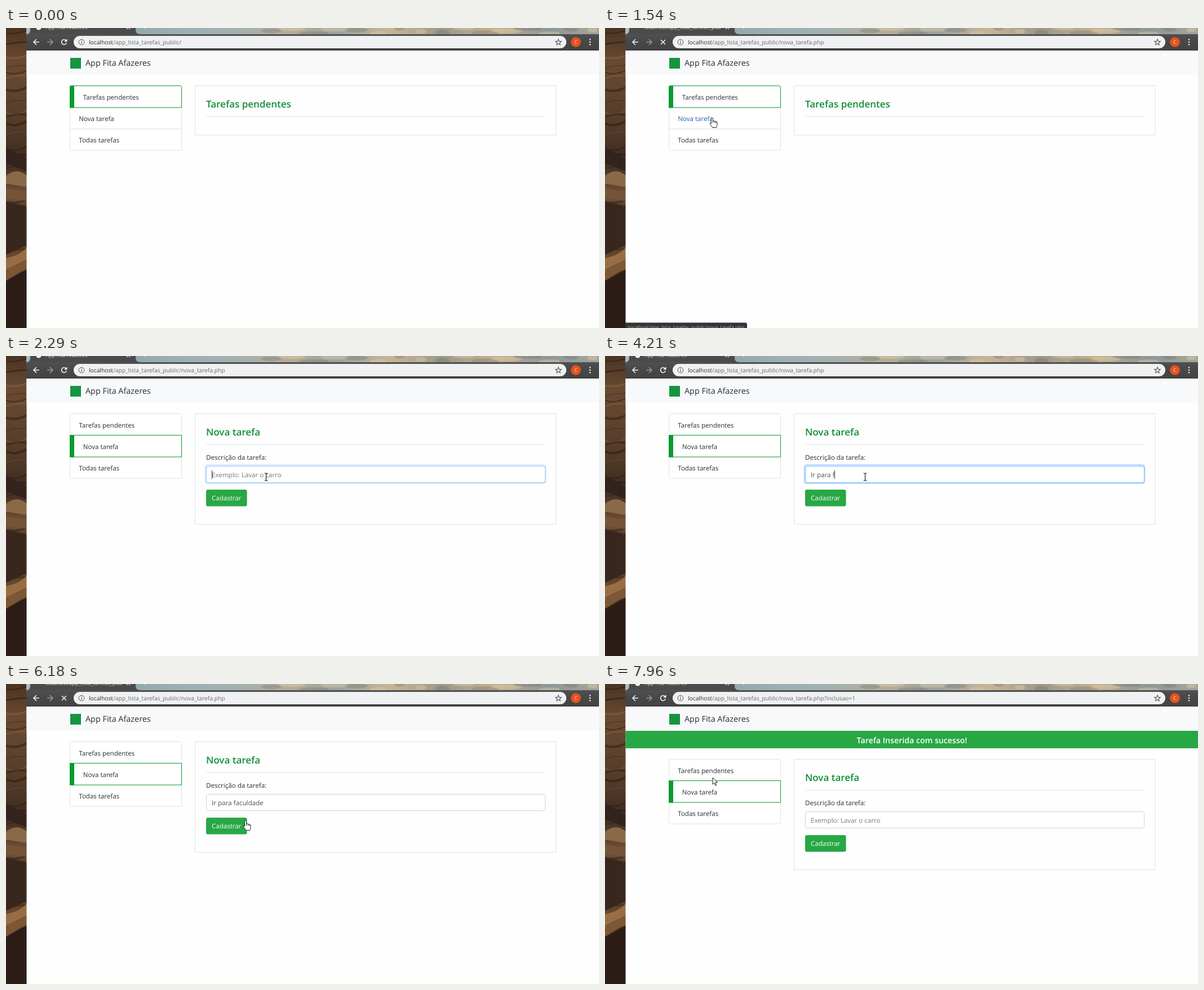
Recreate the animation shown at these times as an HTML page with a canvas. Size 1052 by 532 pixels, loop 8 s.

```html
<!DOCTYPE html>
<html lang="pt-BR">
<head>
<meta charset="utf-8">
<title>App Fita Afazeres</title>
<style>
html, body { margin: 0; width: 100%; height: 100%; overflow: hidden; background: #fefefe; }
canvas { display: block; }
</style>
</head>
<body>
<canvas id="stage" width="1052" height="532"></canvas>
<script>
const c = document.getElementById('stage').getContext('2d');
const LOOP = 8000;
const GREEN = '#28a745', DARK_GREEN = '#079b31', LINE = '#dfe1e3', INK = '#292d31';
const HOST = 'localhost', ROOT = '/app_lista_tarefas_public/';
const APP = 'App Fita Afazeres';
const NAV = ['Tarefas pendentes', 'Nova tarefa', 'Todas tarefas'];

const TYPED = 'Ir para faculdade';
const KEY_TIMES = [2910, 3220, 3250, 3470, 3530, 3760, 3880, 3970, 4210,
  4330, 4440, 4550, 4780, 4870, 4960, 5050, 5140];
const FOCUS = 2200, LOADED = 1720, SENT = 6100, SAVED = 6260;

// Pointer hot spot: time, x, y
const PATH = [[500, 951, 534], [1000, 195, 153], [1180, 195, 153], [1270, 190, 159],
  [1640, 190, 159], [2130, 461.5, 214.5], [5550, 461.5, 214.5], [5730, 460, 261],
  [5950, 425, 242], [6370, 425, 242], [6600, 436, 226.5], [6890, 444, 239.5],
  [7190, 444, 239.5], [7960, 191, 166]];

const clamp = v => Math.max(0, Math.min(1, v));
const inside = (p, x, y, w, h) => p.x >= x && p.x <= x + w && p.y >= y && p.y <= y + h;

function rect(x, y, w, h, color) {
  c.fillStyle = color;
  c.fillRect(x, y, w, h);
}

function box(x, y, w, h, radius, fill, stroke, width = 1) {
  c.beginPath();
  c.roundRect(x, y, w, h, radius);
  if (fill) { c.fillStyle = fill; c.fill(); }
  if (stroke) { c.strokeStyle = stroke; c.lineWidth = width; c.stroke(); }
}

function dot(x, y, r, color) {
  c.beginPath();
  c.arc(x, y, r, 0, Math.PI * 2);
  c.fillStyle = color;
  c.fill();
}

function shape(d, stroke, width = 1, fill) {
  const p = new Path2D(d);
  if (fill) { c.fillStyle = fill; c.fill(p); }
  if (stroke) { c.strokeStyle = stroke; c.lineWidth = width; c.stroke(p); }
}

function text(s, x, y, size, color, weight = 400, align = 'left') {
  c.font = `${weight} ${size}px "Open Sans", "Noto Sans", sans-serif`;
  c.textAlign = align;
  c.fillStyle = color;
  c.fillText(s, x, y);
  return c.measureText(s).width;
}

function gradient(x1, y1, x2, y2, colors) {
  const g = c.createLinearGradient(x1, y1, x2, y2);
  colors.forEach((color, i) => g.addColorStop(i / (colors.length - 1), color));
  return g;
}

function wallpaper() {
  rect(0, 0, 37, 532, gradient(0, 0, 0, 532, ['#4b3423', '#684a32', '#5e432d', '#523a28',
    '#3c2a20', '#6f5238', '#49331f', '#6d4a2f', '#2c1c16', '#251813']));
  for (let i = 0; i < 34; i++) {
    const y = i * 16 + 7 * Math.sin(i * 5);
    shape(`M0 ${y} Q18 ${y + 8 * Math.sin(i * 3)} 37 ${y - 4}`,
      i % 3 ? 'rgba(25,14,10,.4)' : 'rgba(160,115,72,.3)', 1 + i % 4);
  }
  shape('M0 212L37 232V254L0 240Z', 0, 0, '#32241c');
  shape('M0 262Q20 246 37 262V282L0 276Z', 0, 0, '#8a6947');
  shape('M0 284L37 290V307L0 301Z', 0, 0, '#745336');
  shape('M0 308L37 316V385L0 402Z', 0, 0, '#39271d');
  shape('M0 408Q24 404 37 389V425L0 446Z', 0, 0, '#996d44');
  shape('M0 428L37 410V425L0 448Z', 0, 0, '#7d5635');
  shape('M0 449L37 428V532H0Z', 0, 0, '#2b1c16');

  rect(36, 0, 1016, 11, gradient(36, 0, 1052, 0, ['#a9bcc0', '#9fb3b7', '#93a8ac', '#9bb0b3',
    '#a2b1b0', '#b6ad99', '#98a2a0', '#c8b594', '#9b988c', '#c4b18f', '#8b9699', '#a6a699']));
  for (let i = 0; i < 16; i++) {
    c.beginPath();
    c.ellipse(470 + i * 38, 5 + 5 * Math.sin(i * 4), 18 + 9 * Math.sin(i * 7), 4, 0, 0, 7);
    c.fillStyle = i % 2 ? 'rgba(225,203,163,.45)' : 'rgba(112,115,112,.35)';
    c.fill();
  }
}

function browser(t) {
  const loading = t >= 1490 && t < LOADED || t >= SENT && t < SAVED + 60;
  shape('M36 11Q43 11 43 3V0H230V3Q230 11 238 11Z', 0, 0, '#4a4b4c');
  if (!loading) dot(58, -1, 4.5, '#f4f4f4');
  c.save();
  c.beginPath();
  c.rect(68, 0, 138, 11);
  c.clip();
  text(loading ? HOST + ROOT : APP, 70, 2, 9.3, '#d4d4d4');
  c.restore();
  shape('M214 -4L220 2M220 -4L214 2M246 -3V2', '#e4e4e4', 1.2);

  rect(36, 11, 1016, 29, gradient(0, 11, 0, 40, ['#505050', '#474747', '#434343']));
  shape('M59 25H49M54 20L49 25L54 30', '#f2f2f2', 1.6);
  shape('M73 25H83M78 20L83 25L78 30', '#999999', 1.6);
  if (loading) {
    shape('M99 21L107 29M107 21L99 29', '#f2f2f2', 1.6);
  } else {
    c.beginPath();
    c.arc(103, 25, 4.4, .25, 5.5);
    c.strokeStyle = '#f2f2f2';
    c.lineWidth = 1.6;
    c.stroke();
    shape('M108.5 19V24.3H103.2Z', 0, 0, '#f2f2f2');
  }
  box(120, 14, 874, 22, 11, '#f0f1f2');
  c.beginPath();
  c.arc(134, 25, 4.8, 0, 7);
  c.strokeStyle = '#555555';
  c.lineWidth = 1;
  c.stroke();
  rect(133.4, 24.3, 1.2, 3.4, '#555555');
  rect(133.4, 22, 1.2, 1.3, '#555555');

  const page = t < 1490 ? '' : t < SAVED ? 'nova_tarefa.php' : 'nova_tarefa.php?inclusao=1';
  const hostWidth = text(HOST, 147, 28.7, 10.25, '#2d2d2d');
  text(ROOT + page, 147 + hostWidth, 28.7, 10.25, '#6a6a6a');

  let star = '';
  for (let i = 0; i < 10; i++) {
    const r = i % 2 ? 2.4 : 5.5, a = i * Math.PI / 5;
    star += `${i ? 'L' : 'M'}${980 + r * Math.sin(a)} ${25.3 - r * Math.cos(a)}`;
  }
  shape(star + 'Z', '#555555', 1.1);
  dot(1011, 25, 8.8, '#e9511f');
  text('C', 1011, 28.3, 8.6, '#fff0e8', 400, 'center');
  for (const y of [20.5, 25, 29.5]) dot(1036, y, 1.35, '#f2f2f2');
}

function menu(active, hover) {
  box(113.5, 102.5, 198, 114.5, 3, '#ffffff', LINE);
  rect(114, 140.5, 197, 1, LINE);
  rect(114, 178.5, 197, 1, LINE);
  NAV.forEach((label, i) => {
    const y = 102.5 + i * 38, on = i === active;
    if (on) {
      const round = i ? 0 : [3, 3, 0, 0];
      box(113.5, y, 198, 38.5, round, '#ffffff', DARK_GREEN);
      box(113, y - .5, 8, 39.5, i ? 0 : [3, 0, 0, 0], DARK_GREEN);
    }
    text(label, on ? 136.8 : 129.3, y + 24, 11.55, i === hover ? '#2460ad' : INK);
  });
}

function form(t) {
  text('Descrição da tarefa:', 355, 184, 11.6, INK);
  const focus = t < SENT - 20 ? clamp((t - FOCUS) / 150) : 0;
  if (focus) box(353.8, 193.3, 603.4, 32.4, 4, null, `rgba(0,123,255,${.27 * focus})`, 2.6);
  box(355.5, 195.5, 601, 29, 3, '#ffffff', '#ced4da');
  if (focus) box(355.5, 195.5, 601, 29, 3, null, `rgba(128,189,255,${focus})`);

  const count = t < SAVED ? KEY_TIMES.filter(k => k <= t).length : 0;
  const width = count
    ? text(TYPED.slice(0, count), 365, 215, 11.6, '#495057')
    : (text('Exemplo: Lavar o carro', 365, 215, 11.6, '#747b81'), 0);
  const since = t - (count ? KEY_TIMES[count - 1] : FOCUS);
  if (focus && since % 1000 < 500) rect(Math.round(365 + width), 203, 1, 15, '#303439');

  box(355, 237, 72.5, 29.5, 3, GREEN);
  text('Cadastrar', 391.2, 256, 11.5, '#ffffff', 400, 'center');
}

function page(t, hover) {
  rect(36.5, 40, 1016, 492, '#fefefe');
  rect(36.5, 40, 1016, 42.5, '#f8f9fb');
  box(114, 53, 19, 19, 0, '#17943f');
  text(APP, 141, 67.3, 14.4, INK);

  const isForm = t >= LOADED;
  c.save();
  if (t >= SAVED) {
    rect(36.5, 83, 1016, 31, GREEN);
    text('Tarefa Inserida com sucesso!', 544.5, 104.5, 14.2, '#ffffff', 600, 'center');
    c.translate(0, 31);
  }
  menu(isForm ? 1 : 0, hover);
  box(335.5, 102.5, 640.5, isForm ? 196 : 87.5, 0, '#fefefe', LINE);
  text(NAV[isForm ? 1 : 0], 355, 141, 17, '#128d36', 600);
  rect(355, 156.5, 602, 1, '#e4e5e6');
  if (isForm) form(t);
  c.restore();
}

function statusBar(t) {
  const alpha = Math.min(clamp((t - 1270) / 120), clamp((2120 - t) / 150));
  if (!alpha) return;
  c.save();
  c.globalAlpha = alpha;
  box(36, 522.5, 216, 12, [0, 3, 0, 0], '#343536');
  text(HOST + ROOT + 'nova_tarefa.php', 41, 533.5, 8.75, '#a9abad');
  c.restore();
}

function pointerAt(t) {
  const i = PATH.findIndex(k => k[0] > t);
  if (i === 0) return null;
  if (i < 0) return { x: 191, y: 166 };
  const [t0, x0, y0] = PATH[i - 1], [t1, x1, y1] = PATH[i];
  const u = (t - t0) / (t1 - t0), e = u * u * (3 - 2 * u);
  return { x: x0 + (x1 - x0) * e, y: y0 + (y1 - y0) * e };
}

function pointer(p, kind) {
  c.save();
  c.translate(p.x, p.y);
  c.lineJoin = 'round';
  if (kind === 'text') {
    shape('M-3 -6.5H-.8L0 -5.8L.8 -6.5H3M0 -6V6M-3 6.5H-.8L0 5.8L.8 6.5H3', '#202020', 1.2);
  } else if (kind === 'hand') {
    shape('M-1.5 .8Q0 -1.2 1.5 .8V6Q3.5 4.8 4.4 6.4Q6.2 5.6 6.7 7.2Q9 6.7 9 9V12'
      + 'Q8.8 14.5 7.5 17.5H.5Q-1 14.8 -3.4 11.5Q-4.8 9 -2.7 9L-1.5 10.3Z'
      + 'M1.5 6V9M4.4 6.4V9.3M6.7 7.2V9.6', '#202020', 1, '#ffffff');
  } else {
    shape('M0 0V12L2.8 9.4L4.9 14.2L6.8 13.3L4.8 8.7H8.5Z', '#202020', 1, '#ffffff');
  }
  c.restore();
}

function draw(t) {
  const p = pointerAt(t), shift = t >= SAVED ? 31 : 0, isForm = t >= LOADED;
  const onLink = p && inside(p, isForm ? 136 : 129, 151 + shift, 64, 18);
  const onInput = p && isForm && inside(p, 355, 195 + shift, 602, 30);
  const onButton = p && isForm && inside(p, 355, 237 + shift, 73, 30);
  wallpaper();
  browser(t);
  page(t, onLink && !isForm ? 1 : -1);
  statusBar(t);
  if (p) pointer(p, onInput ? 'text' : onLink || onButton ? 'hand' : 'arrow');
}

function tick(now) {
  c.textRendering = 'geometricPrecision';
  draw(now % LOOP);
  requestAnimationFrame(tick);
}
tick(performance.now());
</script>
</body>
</html>
```
